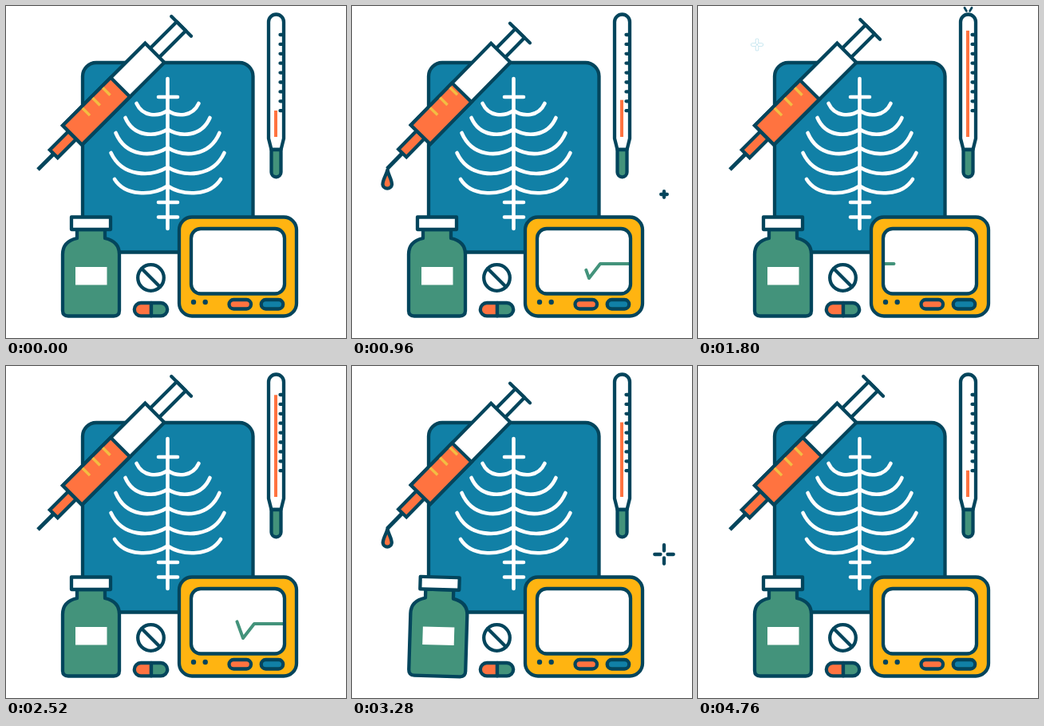
Write an HTML page that moves like this. It is 426x416 px and loops after 4.8 s.

```html
<!DOCTYPE html>
<html lang="en">
<head>
<meta charset="utf-8">
<title>Medical kit</title>
<style>
  html, body { margin: 0; width: 100%; height: 100%; overflow: hidden; background: #fff; }
  svg { display: block; width: 100%; height: 100%; }
  .ink { stroke: #03455c; stroke-width: 4.3; stroke-linejoin: round; stroke-linecap: round; fill: none; }
  .square { stroke-linejoin: miter; }
  .white { fill: #fff; }
  .blue { fill: #1180a6; }
  .green { fill: #43937b; }
  .orange { fill: #ff7340; }
  .yellow { fill: #ffb411; }
  .bone { stroke: #fff; stroke-width: 4.6; stroke-linecap: round; fill: none; }
  .mark { stroke: #f3bd42; stroke-width: 3.5; stroke-linecap: butt; }
</style>
</head>
<body>
<svg viewBox="0 0 426 416">
  <defs>
    <clipPath id="screenClip"><rect x="232" y="279" width="117" height="81.5" rx="12"/></clipPath>
  </defs>

  <!-- X-ray -->
  <rect class="ink blue" x="96" y="71" width="213.5" height="237.5" rx="17"/>
  <path class="bone" d="M202.5 91V279M191 114h24M191 246h24M191 264.5h24"/>
  <path class="bone" id="ribs"/>

  <!-- Syringe, laid along its own axis from the needle tip -->
  <g class="ink" transform="translate(40 205) rotate(-45)">
    <g id="syringe">
      <path d="M0 0H28" stroke-linecap="butt" stroke-width="5"/>
      <rect class="orange square" x="28" y="-7" width="33" height="14"/>
      <g id="plunger">
        <rect class="white" x="180" y="-8" width="74" height="16"/>
        <path d="M254-17.5v35"/>
      </g>
      <rect class="white square" x="61" y="-17" width="146" height="34"/>
      <rect class="orange square" id="liquid" x="61" y="-17" height="34"/>
      <path class="mark" d="M94-15v13M112-15v13M130-15v13"/>
    </g>
  </g>
  <path class="ink orange" id="drop" vector-effect="non-scaling-stroke"
        d="M0 0C1 7 5.5 12 5.5 18.5A5.8 5.8 0 0 1-6 18.5C-6 12-1.5 7 0 0Z"/>

  <!-- Thermometer -->
  <path class="ink white" d="M329 20a9.5 9.5 0 0 1 19 0V166L344.5 180H332.5L329 166Z"/>
  <path class="ink green" d="M332.5 180h12v28.3a6 6 0 0 1-12 0Z"/>
  <path class="ink" id="scale"/>
  <path id="mercury" stroke="#ff7340" stroke-width="4"/>

  <!-- Bottle -->
  <g class="ink" id="bottle">
    <path class="green" d="M89 280V291Q71 295 71 311V381.5Q71 388.5 78 388.5H135Q142 388.5 142 381.5V311Q142 295 124 291V280Z"/>
    <rect class="white" x="82" y="264.5" width="49" height="15.5"/>
    <path class="white" stroke="none" d="M87 327h39.5v22.5H87Z" style="stroke: none"/>
  </g>

  <!-- Pills -->
  <g class="ink">
    <circle class="white" cx="181.5" cy="340.5" r="16.3"/>
    <path d="M170 329L193 352"/>
    <path class="orange" d="M182 372H169a8.2 8.2 0 0 0 0 16.4H182Z"/>
    <path class="green" d="M182 372H194a8.2 8.2 0 0 1 0 16.4H182Z"/>
  </g>

  <!-- Monitor -->
  <rect class="ink yellow" x="217" y="264.5" width="147" height="124" rx="16"/>
  <rect class="white" x="232" y="279" width="117" height="81.5" rx="12"/>
  <path id="pulse" clip-path="url(#screenClip)" fill="none" stroke="#43937b" stroke-width="4"
        stroke-linecap="round" stroke-linejoin="round" d="M232 323H268L281 297L297 341L311 323H350"/>
  <rect class="ink" x="232" y="279" width="117" height="81.5" rx="12"/>
  <g fill="#03455c"><circle cx="235" cy="371" r="3.2"/><circle cx="249.7" cy="371" r="3.2"/></g>
  <rect class="ink orange" x="279.5" y="368" width="27.5" height="11.5" rx="5.7"/>
  <rect class="ink blue" x="319.7" y="368" width="27.5" height="11.5" rx="5.7"/>

  <!-- Bursts -->
  <path class="ink" id="sparkRight"/>
  <path id="sparkEdge" stroke="#bfe3ee" stroke-width="4.5" stroke-linecap="round"/>
  <path id="sparkLeft" stroke="#fff" stroke-width="2.8" stroke-linecap="round"/>
  <path class="ink" id="splash"/>
  <path class="ink" id="steam" style="stroke-width: 2.8"/>
</svg>
<script>
const LOOP = 4800;
const $ = id => document.getElementById(id);
const set = (id, name, value) => $(id).setAttribute(name, value);
const progress = (t, start, length) => Math.min(1, Math.max(0, (t - start) / length));
const ease = (t, start, length) => (1 - Math.cos(Math.PI * progress(t, start, length))) / 2;

// Each rib: tip distance from the spine, tip height, sag, height at the spine
const ribs = [
  [39, 122, 14, 131], [53, 140, 20, 154.5], [65, 159, 25, 177.5],
  [71, 184, 25, 202], [66.5, 217, 17.5, 225.5],
];
set('ribs', 'd', ribs.map(([w, y, sag, spine]) => [-1, 1].map(side => {
  const x = f => 202.5 + side * w * f;
  const low = y + sag * 1.22;
  return `M${x(1)} ${y}C${x(.8)} ${low} ${x(.3)} ${low} ${x(0)} ${spine}`;
}).join('')).join(''));

set('scale', 'd', Array.from({ length: 9 }, (_, i) => `M343.5 ${36 + i * 11.9}h4`).join(''));

const CROSS = [0, 90, 180, 270];
const FORK = [-60, -120];

// Rays that shoot out from a point and shrink away at their far end
function burst(id, cx, cy, angles, radius, t, start, length) {
  const p = (t - start) / length;
  const inner = radius * p;
  const outer = radius * Math.min(1, p * 2.6);
  const ray = a => {
    const c = Math.cos(a * Math.PI / 180), s = Math.sin(a * Math.PI / 180);
    return `M${cx + c * inner} ${cy + s * inner}L${cx + c * outer} ${cy + s * outer}`;
  };
  set(id, 'd', p > 0 && p < 1 ? angles.map(ray).join('') : '');
}

function drawSyringe(c) {
  const push = ease(c, 240, 680) - ease(c, 1440, 690);
  set('plunger', 'transform', `translate(${-12 * push} 0)`);
  set('liquid', 'width', 85 - 10 * push);

  // The needle end squashes and tilts a little while the drop is pressed out
  const squash = ease(c, 240, 640) - ease(c, 1000, 400);
  set('syringe', 'transform',
    `translate(207 0) rotate(${-.58 * squash}) scale(${1 - .017 * squash} 1) translate(-207 0)`);

  const grow = ease(c, 480, 460);
  const fall = progress(c, 920, 480) ** 2;
  set('drop', 'transform', `translate(${44.5 - 4 * fall} ${204 + 150 * fall}) scale(${grow})`);
  set('drop', 'visibility', grow > 0 && fall < 1 ? 'visible' : 'hidden');
  burst('splash', 39.5, 384, FORK, 15, c, 1400, 240);
}

function drawPulse(c) {
  const length = $('pulse').getTotalLength();
  const head = length * ease(c, 82, 662);
  const tail = length * ease(c, 425, 970);
  set('pulse', 'stroke-dasharray', `0 ${tail} ${head - tail} ${length * 2}`);
  set('pulse', 'visibility', head - tail > .5 ? 'visible' : 'hidden');
}

function draw(t) {
  drawSyringe(t % 2400);
  drawPulse(t % 1600);

  const level = 131 - 101 * (ease(t, 680, 1190) - ease(t, 2080, 2750));
  set('mercury', 'd', `M338 ${level}V164`);
  burst('steam', 338.5, 10, FORK, 9, t, 1690, 240);

  const swing = progress(t, 3200, 400);
  set('bottle', 'transform', `rotate(${1.8 * Math.sin(swing * 2 * Math.PI)} 107 389)`);

  burst('sparkRight', 391, 236, CROSS, 12.5, t, t < 2400 ? 890 : 3064, 600);
  for (const id of ['sparkEdge', 'sparkLeft'])
    burst(id, 74, 48.5, CROSS, 12, t, t < 2800 ? 1690 : 3740, 600);
}

function tick() {
  draw(performance.now() % LOOP);
  requestAnimationFrame(tick);
}
tick();
</script>
</body>
</html>
```
